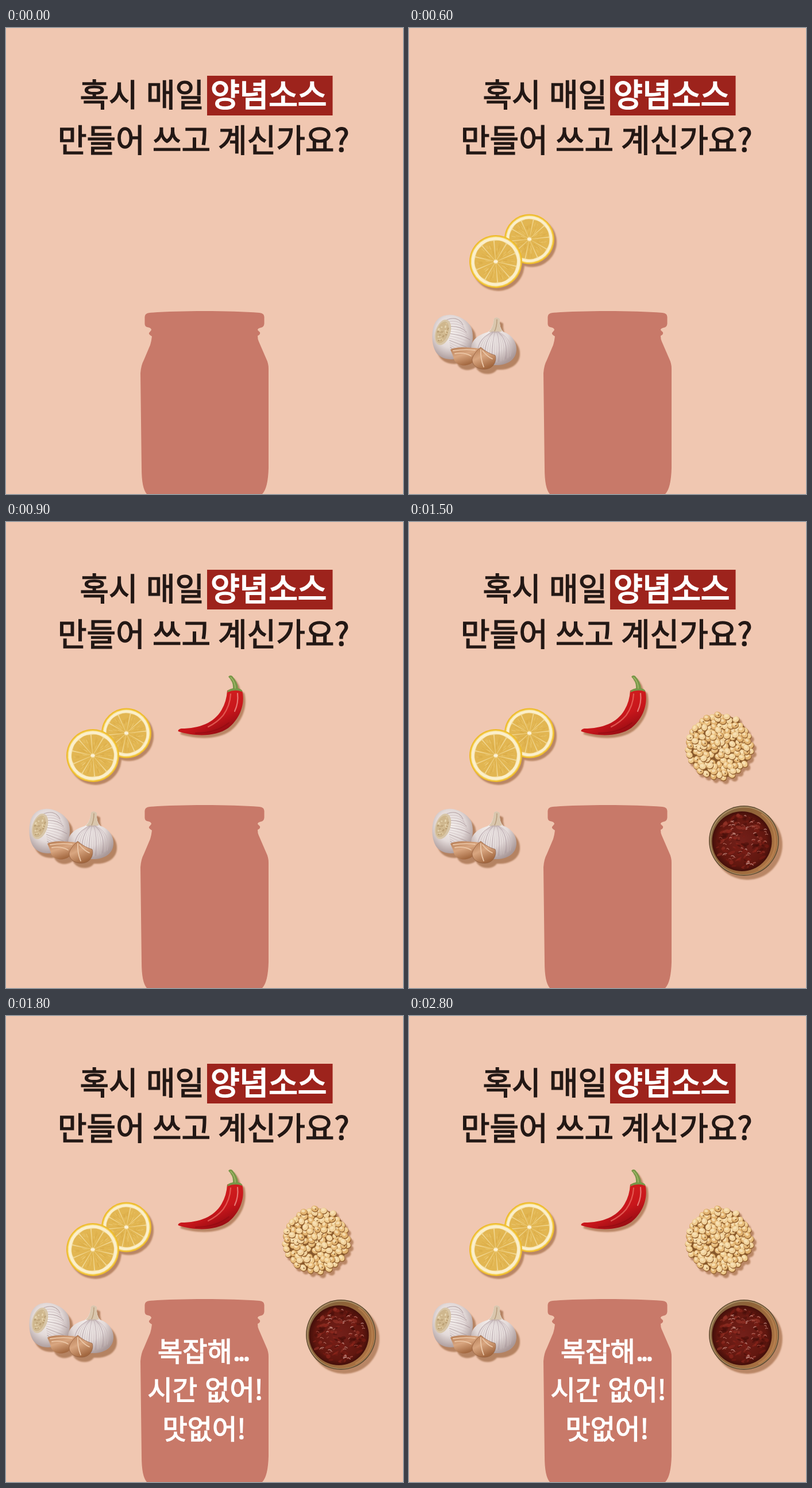
An HTML page that plays this animation: 691 px wide and 810 px high, repeating every 3300 ms.

```html
<!DOCTYPE html>
<html lang="ko">
<head>
<meta charset="utf-8">
<style>
  html, body { margin: 0; width: 100%; height: 100%; overflow: hidden; background: #f0c7b1; }
  svg { display: block; width: 100%; height: 100%; }
  text { font-family: "Noto Sans CJK KR", "Noto Sans CJK", "Noto Sans CJK JP", sans-serif; font-weight: 400; }
  .title { font-size: 55px; fill: #231815; stroke: #231815; stroke-width: 1.5px; }
  .title .key { fill: #fff; stroke: #fff; stroke-width: 2.2px; }
  .jar-text { font-size: 47px; stroke-width: 1.5px; }
  .food { filter: drop-shadow(4px 5px 1px #b98665); }
  #garlic { filter: drop-shadow(6px 8px 1px #b58362); }
  #bowl { filter: drop-shadow(6px 7px 1px #b98665); }
</style>
</head>
<body>
<svg viewBox="0 0 691 810">
  <defs>
    <radialGradient id="bulb" cx=".45" cy=".38" r=".65">
      <stop offset="0" stop-color="#f5f0ee"/><stop offset=".55" stop-color="#e3dad9"/><stop offset="1" stop-color="#a99898"/>
    </radialGradient>
    <linearGradient id="clove" x1="0" y1="0" x2=".5" y2="1">
      <stop offset="0" stop-color="#b37a52"/><stop offset=".5" stop-color="#d9a680"/><stop offset="1" stop-color="#a2673f"/>
    </linearGradient>
    <linearGradient id="wood" x1="0" y1="0" x2="1" y2=".6">
      <stop offset="0" stop-color="#7d6544"/><stop offset=".45" stop-color="#8f6338"/><stop offset="1" stop-color="#ab7243"/>
    </linearGradient>
    <radialGradient id="sauce" cx=".5" cy=".5" r=".5">
      <stop offset="0" stop-color="#74201a"/><stop offset=".8" stop-color="#62170f"/><stop offset="1" stop-color="#430f0a"/>
    </radialGradient>
    <linearGradient id="pepper" x1=".3" y1=".2" x2=".75" y2=".9">
      <stop offset="0" stop-color="#d3201f"/><stop offset=".6" stop-color="#c8161b"/><stop offset="1" stop-color="#960c13"/>
    </linearGradient>
  </defs>

  <rect width="691" height="810" fill="#f0c7b1"/>
  <rect x="350" y="83" width="218.500" height="69" fill="#9d231c"/>
  <g class="title">
    <text x="128.500" y="136">혹시</text>
    <text x="244" y="136">매일</text>
    <text x="356" y="136" class="key">양념소스</text>
    <text x="90" y="214.500">만들어</text>
    <text x="255" y="214.500">쓰고</text>
    <text x="369" y="214.500">계신가요?</text>
  </g>

  <path fill="#c87969" d="M241.500 502Q241.500 496 250 495C300 491 390 491 441 495Q449.500 496 449.500 502V514Q449 520 443 521Q438 522 438 525L442 529Q443 533 438 535Q438 541 440 545L453 575Q457 583 457 592V765Q456 800 446 810H245Q236 800 236 765L234 600Q235 586 240 577L251 551Q253 545 254 536Q248 533 249 530L253 525Q253 521 246 520Q241.500 519 241.500 514Z"/>

  <g id="garlic" class="food"></g>
  <g id="lemon" class="food"></g>
  <g id="chili" class="food"></g>
  <g id="beans" class="food"></g>
  <g id="bowl" class="food"></g>

  <g id="words" class="jar-text">
    <text x="264" y="600">복잡해<tspan x="395" letter-spacing="-4.500">...</tspan></text>
    <text x="246.500" y="667">시간 없어!</text>
    <text x="272.500" y="735">맛없어!</text>
  </g>
</svg>

<script>
const LOOP = 3300;
const STARTS = { garlic: 300, lemon: 600, chili: 900, beans: 1200, bowl: 1500, words: 1800 };
const el = id => document.getElementById(id);

let seed = 11;
const rnd = () => (seed = seed * 16807 % 2147483647) / 2147483647;
const between = (a, b) => a + rnd() * (b - a);
const pick = list => list[Math.floor(rnd() * list.length)];
const polar = (r, a) => `${(r * Math.cos(a)).toFixed(1)} ${(r * Math.sin(a)).toFixed(1)}`;
const inDisc = (x, y, radius) => {
  const a = between(0, 2 * Math.PI), r = radius * Math.sqrt(rnd());
  return [x + r * Math.cos(a), y + r * Math.sin(a)];
};
const repeat = (n, fn) => Array.from({ length: n }, (_, i) => fn(i)).join('');
const path = (d, fill, more = '') => `<path d="${d}" fill="${fill}" ${more}/>`;
const line = (d, color, width, more = '') =>
  path(d, 'none', `stroke="${color}" stroke-width="${width}" stroke-linecap="round" ${more}`);
const oval = (x, y, rx, ry, fill, turn = 0, more = '') =>
  `<ellipse cx="${x}" cy="${y}" rx="${rx}" ry="${ry}" fill="${fill}" transform="rotate(${turn} ${x} ${y})" ${more}/>`;

function slice(x, y, r, turn) {
  const inner = r * 0.76;
  const wedges = repeat(10, i => {
    const a = i * Math.PI / 5;
    const wedge = `M${polar(5, a)}L${polar(inner, a - .25)}Q${polar(inner * 1.07, a)} ${polar(inner, a + .25)}Z`;
    const pulp = repeat(9, () => {
      const b = a + between(-.2, .2), from = between(9, inner * .8);
      return line(`M${polar(from, b)}L${polar(from + 6, b)}`, pick(['#ecca74', '#d9a945']), 1.2, 'opacity=".55"');
    });
    return path(wedge, '#e2b652', 'stroke="#e2b652" stroke-width="2.500" stroke-linejoin="round"') + pulp;
  });
  return `<g transform="translate(${x} ${y}) rotate(${turn})">` +
    oval(0, 0, r, r, '#eebb2c') + oval(0, 0, r - 2, r - 2, '#f6d566') +
    oval(0, 0, r - 3.5, r - 3.5, '#fbefcb') + oval(0, 0, inner + 2.5, inner + 2.5, '#f0d58f') +
    wedges + oval(0, 0, 3.5, 2.5, '#fbf1d6') + '</g>';
}

function drawGarlic() {
  const tilted = path('M66 499C79 496 103 506 109 522C114 540 110 561 96 570C80 579 58 578 48 565C39 552 39 531 43 518C47 506 56 500 66 499Z', 'url(#bulb)') +
    repeat(13, i => line(`M${66 + i * .5} ${507 + i * 4}Q${94 - Math.abs(i - 6) * 1.4} ${500 + i * 5.6} ${106 - Math.abs(i - 6) * 2} ${516 + i * 4.3}`,
      i % 3 ? '#cabbbd' : '#a99599', 1.2, 'opacity=".7"')) +
    oval(59, 529, 13, 23, '#d8c6a8', 18) + oval(58, 529, 10, 19.5, '#cfb78e', 18) +
    repeat(36, () => {
      const [x, y] = inDisc(0, 0, 1);
      return oval(58 + 9 * x - 5 * y, 529 + 16 * y, 1.5, 1.1, pick(['#e8d8b5', '#b79b70', '#dcc59b']));
    });
  const upright = path('M148 505Q153 501 158 506Q157 521 164 528C181 534 188 548 187 560C186 578 169 587 148 586C124 586 107 575 108 556C109 542 121 533 136 529Q146 524 148 505Z', 'url(#bulb)') +
    path('M148 505Q153 501 158 506Q157 519 162 527Q151 532 139 528Q147 521 148 505Z', '#d9c6ad') +
    line('M153 507Q153 519 149 527', '#b59a79', 1.4) +
    repeat(15, i => line(`M${145 + i * .8} 528Q${116 + i * 4.8} 543 ${120 + i * 4} ${570 + 11 * Math.sin(i * .22)}`,
      i % 3 ? '#cabbbd' : '#a6929a', 1.2, 'opacity=".65"'));
  const cloves = path('M72 559C83 553 105 555 122 557Q116 566 112 580C103 589 86 589 79 578Q76 567 72 559Z', 'url(#clove)') +
    line('M77 561Q96 558 115 560M80 566Q96 563 108 570', '#ebc5a4', 1.8) +
    path('M110 575C113 566 120 558 125 555Q136 565 150 569C153 579 147 592 133 593C121 594 109 587 110 575Z', 'url(#clove)', 'stroke="#8d5838" stroke-width=".7"') +
    line('M125 559Q124 574 130 589M128 561Q137 572 145 575', '#ebc8aa', 1.8);
  return tilted + upright + cloves;
}

function drawChili() {
  return path('M385 293Q398 286 411 293C417 316 407 342 387 358C364 374 328 373 300 364Q298 361 305 359C337 359 362 349 375 327Q384 312 385 293Z', 'url(#pepper)') +
    line('M391 299Q390 319 378 336Q368 348 352 356', '#ee7468', 2.2, 'opacity=".7"') +
    line('M403 298Q405 314 398 329', '#f2a095', 2.2, 'opacity=".7"') +
    line('M330 367Q365 367 388 349', '#830a11', 2, 'opacity=".45"') +
    path('M387 269Q390 265 394 268Q403 278 404 289Q412 291 411 295Q399 290 385 296Q385 291 395 289Q396 278 387 269Z', '#789748') +
    line('M391 270Q399 278 399 289', '#a5bb6b', 1.5);
}

// Each new point is the candidate farthest from those already placed.
function scatter(count, x, y, radius) {
  const points = [];
  const gap = p => Math.min(...points.map(q => Math.hypot(p[0] - q[0], p[1] - q[1])));
  while (points.length < count) {
    const tries = Array.from({ length: 40 }, () => inDisc(x, y, radius)).map(p => [gap(p), p]);
    points.push(tries.reduce((best, next) => next[0] > best[0] ? next : best)[1]);
  }
  return points;
}

function drawBeans() {
  const beans = scatter(128, 540, 389.5, 55).map(([x, y], i) => {
    const turn = between(0, 180);
    return oval(x + .5, y + 1, 6.2, 5.5, '#946130', turn) +
      oval(x, y, 5.8, 5, pick(['#e8bd7c', '#efcb8e', '#e2b370', '#f1d29c']), turn) +
      oval(x - 1, y - 1.3, 3.2, 2.4, '#f9e4ba', turn, 'opacity=".8"') +
      (i % 5 ? '' : oval(x + 1.5, y + 1, 1.4, .8, '#7a532c', turn));
  });
  return oval(540.5, 390, 55, 55, '#87582b') + beans.join('');
}

function drawBowl() {
  const texture = repeat(110, () => {
    const [x, y] = inDisc(580, 555, 46);
    return oval(x, y, between(2, 7), between(1, 3.5),
      pick(['#8d261c', '#4c110b', '#7a1c14', '#98352a', '#430e09']), between(-60, 30), 'opacity=".6"');
  });
  const shine = repeat(55, () => {
    const [x, y] = inDisc(581, 554, 44);
    return line(`M${x} ${y}q${between(1, 3)} -2 ${between(2, 6)} ${between(-2, 2)}`,
      pick(['#c98478', '#dfb0a6', '#b05a4e']), 1.2, 'opacity=".7"');
  });
  return oval(583, 554, 61, 61, '#5f4a31') + oval(583, 554, 59.5, 59.5, '#a98c62') +
    oval(583.5, 554.5, 58, 58, 'url(#wood)') +
    line('M614 508Q641 527 637 565Q632 592 609 604', '#c08a57', 2.5, 'opacity=".6"') +
    oval(579.5, 555, 52, 52, 'url(#sauce)') + texture + shine;
}

el('garlic').innerHTML = drawGarlic();
el('lemon').innerHTML = slice(209.5, 367, 43.5, 12) + slice(151, 406, 46, -5);
el('chili').innerHTML = drawChili();
el('beans').innerHTML = drawBeans();
el('bowl').innerHTML = drawBowl();

function render(t) {
  for (const id in STARTS) el(id).style.display = t >= STARTS[id] ? '' : 'none';
  const ink = t >= 2300 && t < 2800 ? '#9d231c' : '#fff';
  el('words').setAttribute('fill', ink);
  el('words').setAttribute('stroke', ink);
}

function tick() {
  render(performance.now() % LOOP);
  requestAnimationFrame(tick);
}
tick();
</script>
</body>
</html>
```
